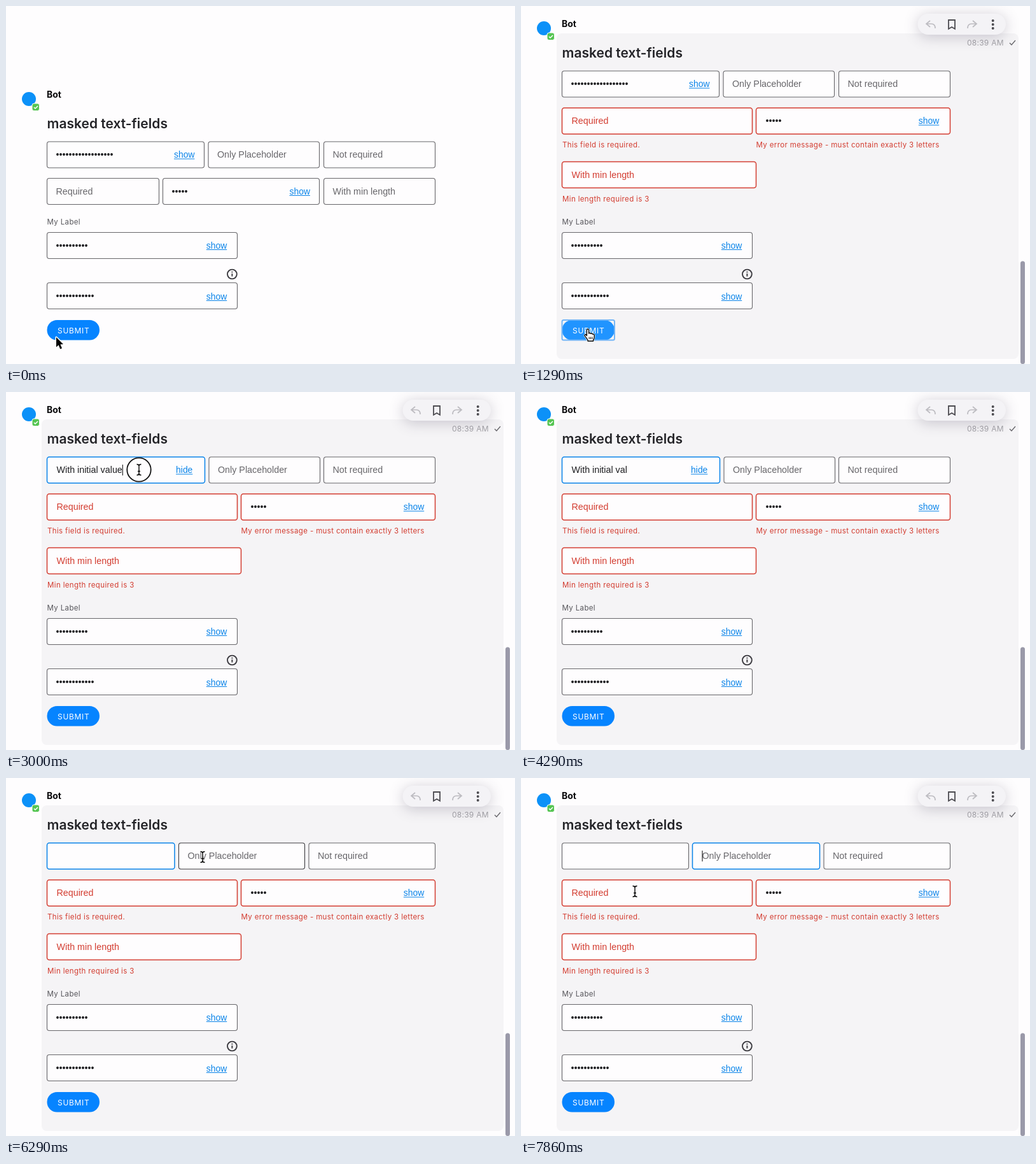
An HTML page with a canvas that plays this animation: 800x562 px, repeating every 8 s.

```html
<!DOCTYPE html>
<html lang="en">
<head>
<meta charset="utf-8">
<title>Masked text fields</title>
<style>
html, body { margin: 0; width: 100%; height: 100%; overflow: hidden; background: #fefdfe; }
canvas { display: block; width: 800px; height: 562px; }
</style>
</head>
<body>
<canvas id="stage"></canvas>
<script>
const canvas = document.getElementById('stage');
const dpr = window.devicePixelRatio || 1;
canvas.width = 800 * dpr;
canvas.height = 562 * dpr;
const c = canvas.getContext('2d');

const ARIAL = '"Liberation Sans", Arial, sans-serif';
const UI = 'Inter, "Open Sans", sans-serif';
const FIELD = `14.3px ${ARIAL}`;
const SMALL = `11.5px ${UI}`;
const PAGE = '#fefdfe', GREY = '#67666a', DARK = '#3c3b40', INK = '#1d1d20';
const BLUE = '#0a84e9', RED = '#d33d31';
const STEPS = 56, RATE = 7;

// Cursor keys: step, x, y
const path = [
  [0, 79, 520], [1, 88, 515], [4, 105, 507], [10, 105, 507], [13, 180, 330],
  [16, 280, 122], [18, 280, 122], [20, 209, 122], [40, 209, 122], [44, 309, 124],
  [49, 309, 124], [52, 262, 148], [54, 211, 168], [55, 179, 178]
];
const clicks = [6, 17, 21, 47];

function cursorAt(k) {
  const i = Math.max(1, path.findIndex(p => p[0] >= k));
  const [k0, x0, y0] = path[i - 1], [k1, x1, y1] = path[i];
  const u = (k - k0) / (k1 - k0);
  return [x0 + (x1 - x0) * u, y0 + (y1 - y0) * u];
}

function text(str, x, y, font, color, spacing = 0, align = 'left') {
  c.font = font;
  c.fillStyle = color;
  c.letterSpacing = spacing + 'px';
  c.textAlign = align;
  c.fillText(str, x, y);
}

function box(x, y, w, h, r, fill, stroke, width = 1) {
  c.beginPath();
  c.roundRect(x, y, w, h, r);
  if (fill) { c.fillStyle = fill; c.fill(); }
  if (stroke) { c.strokeStyle = stroke; c.lineWidth = width; c.stroke(); }
}

function line(d, color, width, x = 0, y = 0) {
  c.save();
  c.translate(x, y);
  c.strokeStyle = color;
  c.lineWidth = width;
  c.stroke(new Path2D(d));
  c.restore();
}

function disc(x, y, r, fill) {
  c.beginPath();
  c.arc(x, y, r, 0, Math.PI * 2);
  c.fillStyle = fill;
  c.fill();
}

function link(label, x, y) {
  text(label, x, y, `13.9px ${ARIAL}`, BLUE, 0, 'center');
  const w = c.measureText(label).width;
  c.fillRect(x - w / 2, y + 1.5, w, 1);
}

// state: '', 'focus', 'error' or 'hover'
function field(x, right, y, { hint = '', value = '', state = '', caret, selected }) {
  const edge = { focus: BLUE, error: RED, hover: DARK }[state] || GREY;
  const strong = state === 'focus' || state === 'error';
  box(x, y, right - x, 41, 3.5, PAGE, edge, strong ? 1.5 : 1.1);
  const tx = x + (strong ? 15 : 14), ty = y + 25;
  c.font = FIELD;
  c.letterSpacing = '0px';
  const w = c.measureText(value).width;
  if (selected) {
    c.fillStyle = '#a9cdf3';
    c.fillRect(tx, y + 12, w, 17);
  }
  text(value || hint, tx, ty, FIELD, value ? INK : state === 'error' ? RED : GREY);
  if (caret) {
    c.fillStyle = '#000';
    c.fillRect(tx + w, y + 12, 1, 17);
  }
}

const dots = n => '•'.repeat(n);

function toolbar(y) {
  c.save();
  c.shadowColor = 'rgba(60,55,80,.26)';
  c.shadowBlur = 22 * dpr;
  c.shadowOffsetY = 3 * dpr;
  box(623.5, y, 138.5, 33, 16.5, '#f4f3f6');
  c.restore();
  const arrow = 'M-1-6 L-7-1 L-1 4 M-7-1 H1 Q7-1 7 6';
  line(arrow, '#bdbcc1', 1.7, 644, y + 17);
  line('M-5-7 H5 V7 L0 4 L-5 7 Z', '#4c4b50', 1.8, 677, y + 17);
  c.save();
  c.translate(709, y + 17);
  c.scale(-1, 1);
  line(arrow, '#bdbcc1', 1.7);
  c.restore();
  for (const dy of [-6, 0, 6]) disc(741.7, y + 17 + dy, 2, '#4c4b50');
}

function header(oy, hovered) {
  disc(36, 146 + oy, 11, '#0c91f8');
  box(41, 153 + oy, 11.5, 11.5, 3, '#55c552', PAGE, 1);
  line('M44 159 l2 2 l4-4', '#fff', 1.5, 0, oy);
  text('Bot', 64, 144 + oy, `bold 14px ${UI}`, '#0b0b0d');
  text('masked text-fields', 64.5, 192 + oy, `600 21px ${UI}`, '#242428');
  if (!hovered) return;
  text('08:39 AM', 701, 173 + oy, `12px ${UI}`, '#a3a2a7', .25);
  line('M768 169 l3 3 l6-7', '#66656a', 1.3, 0, oy);
  toolbar(123 + oy);
}

function firstRow(k, y) {
  const filled = k < 39, focus1 = k >= 21 && k < 47, focus2 = k >= 47;
  const shown = k >= 18;
  const edges = !filled ? (focus2 ? [263.5, 269.5, 469.5, 476] : [265, 271.5, 469.5, 476])
    : focus1 ? [312.5, 319, 493.5, 499.5] : [311.5, 318, 492.5, 499.5];
  const word = 'With initial value';
  const value = !filled ? '' : !shown ? dots(18)
    : word.slice(0, k < 25 ? 18 : k < 26 ? 17 : 16);
  const caretOn = k < 28 || (k >= 32 && k < 35) || (k >= 39 && k < 42);
  field(64.5, edges[0], y, {
    value, state: focus1 ? 'focus' : '', caret: focus1 && caretOn,
    selected: k >= 36 && filled
  });
  if (filled) link(shown ? 'hide' : 'show', 280.2, y + 25);
  field(edges[1], edges[2], y, {
    hint: 'Only Placeholder',
    state: focus2 ? 'focus' : k >= 43 ? 'hover' : '',
    caret: focus2 && (k < 50 || k > 53)
  });
  field(edges[3], 674.5, y, { hint: 'Not required' });
}

function otherRows(failed) {
  if (failed) {
    field(64.5, 363.5, 160, { hint: 'Required', state: 'error' });
    field(369.5, 674.5, 160, { value: dots(5), state: 'error' });
    link('show', 641, 185);
    field(64.5, 369.5, 244.5, { hint: 'With min length', state: 'error' });
    text('This field is required.', 65, 221.5, SMALL, RED, .36);
    text('My error message - must contain exactly 3 letters', 369.5, 221.5, SMALL, RED, .36);
    text('Min length required is 3', 65, 306.5, SMALL, RED, .36);
  } else {
    field(64.5, 240.5, 270.5, { hint: 'Required' });
    field(246.5, 492.5, 270.5, { value: dots(5) });
    link('show', 461.7, 295.5);
    field(499.5, 674.5, 270.5, { hint: 'With min length' });
  }
  text('My Label', 64.5, 342.5, SMALL, '#57565b', .36);
  field(64.5, 363.5, 355.5, { value: dots(10) });
  link('show', 331, 380.5);
  line('M348 421 a7.4 7.4 0 1 0 14.8 0 a7.4 7.4 0 1 0 -14.8 0 M355.4 420 v4.6 M355.4 416.8 v1.8', DARK, 1.9);
  field(64.5, 363.5, 434.5, { value: dots(12) });
  link('show', 331, 460.5);
}

function submit(k) {
  const pressed = k === 6 || k === 7;
  const over = k >= 1 && k <= 10;
  box(64.5, 493, 82.5, 31.5, 15.75, pressed ? '#0a68cb' : over ? '#2094ff' : '#0684ff');
  if (k >= 6 && k < 17) box(64.5, 493, 82.5, 31.5, 2.5, null, '#72b5f7', 2);
  text('SUBMIT', 81, 513.5, `12px ${UI}`, pressed ? '#d6e6f8' : '#fff', .7);
}

const shapes = {
  arrow: new Path2D('M0 0 V15.5 L3.6 12.2 L6.2 18.4 L9 17.2 L6.4 11.2 L11 11 Z'),
  hand: new Path2D('M-1.6 1.5 Q0-1.5 1.6 1.5 V7 Q3.4 5.4 4.6 7.4 Q6.4 6.4 7.6 8.2 Q10 7.6 10.2 10 V13 Q10 15.5 8.6 17.5 V19 H0 V17.5 Q-2 14-5 10.6 Q-4.6 8-2.6 9.2 L-1.6 10.6 Z'),
  beam: new Path2D('M-3.5-8.5 Q0-8.5 0-6 Q0-8.5 3.5-8.5 M0-6 V6 M-3.5 8.5 Q0 8.5 0 6 Q0 8.5 3.5 8.5 M-2 2.5 H2')
};

function cursorKind(k) {
  if (k === 0) return 'arrow';
  if (k <= 10 || (k >= 16 && k <= 18)) return 'hand';
  return k < 16 ? 'arrow' : 'beam';
}

function cursor(k) {
  if (k >= 25 && k < 41) return;
  const [x, y] = cursorAt(k), kind = cursorKind(k), shape = shapes[kind];
  const click = clicks.find(s => k === s || k === s + 1);
  c.save();
  c.translate(x, y);
  if (click !== undefined) {
    c.beginPath();
    c.arc(0, 0, k === click ? 18.7 : 34.3, 0, Math.PI * 2);
    c.strokeStyle = '#111';
    c.lineWidth = 1.8;
    c.stroke();
  }
  c.lineJoin = 'round';
  c.strokeStyle = '#fff';
  c.lineWidth = kind === 'hand' ? 2.6 : 3;
  c.stroke(shape);
  if (kind === 'arrow') {
    c.fillStyle = '#000';
    c.fill(shape);
  } else {
    c.fillStyle = '#fff';
    if (kind === 'hand') c.fill(shape);
    c.strokeStyle = '#000';
    c.lineWidth = 1.4;
    c.stroke(shape);
    if (kind === 'hand') line('M2.2 12.5 v3.5 M4.6 12.5 v3.5 M7 12.5 v3.5', '#000', 1);
  }
  c.restore();
}

function draw(now) {
  const k = Math.floor((now % 8000 + 5) * RATE / 1000) % STEPS;
  const hovered = k >= 1, failed = k >= 9, oy = failed ? -111 : 0;
  c.setTransform(dpr, 0, 0, dpr, 0, 0);
  c.fillStyle = PAGE;
  c.fillRect(0, 0, 800, 562);
  if (hovered) {
    box(56, 154 + oy, 726, 400 - oy, 8, '#f5f4f6');
    const top = failed ? 400.5 : 396;
    box(785, top, 7, 562 - top, 3.5, '#9a99a9');
  }
  header(oy, hovered);
  firstRow(k, 213 + oy);
  otherRows(failed);
  submit(k);
  cursor(k);
}

let start;
function tick(now) {
  start ??= now;
  draw(now - start);
  requestAnimationFrame(tick);
}
requestAnimationFrame(tick);
</script>
</body>
</html>
```
